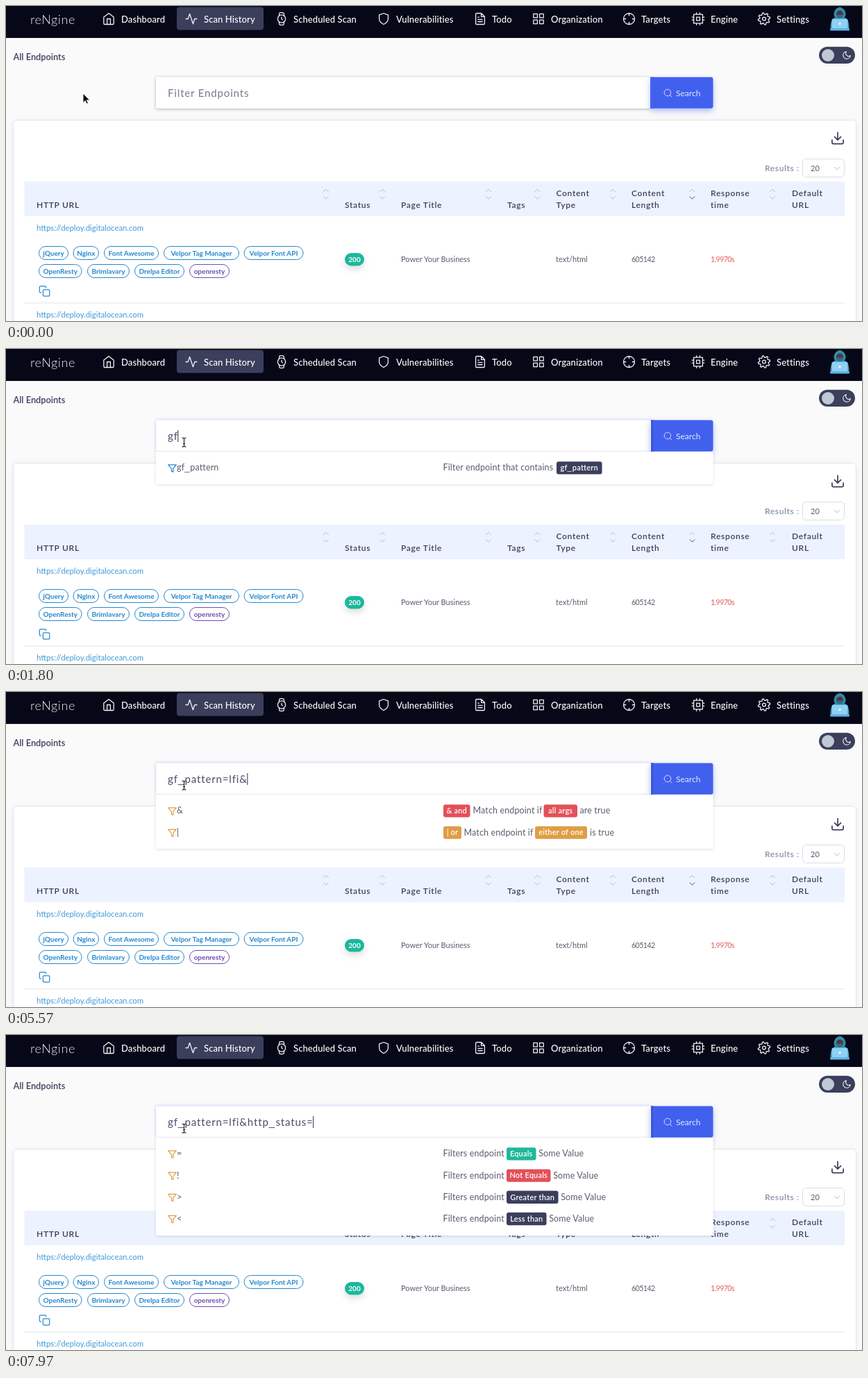
These frames come from a looping animation (1233 by 454 pixels, 8000 ms). An HTML page:

```html
<!DOCTYPE html>
<html lang="en">
<head>
<meta charset="utf-8">
<title>Endpoint filter</title>
<style>
  html, body { margin: 0; width: 100%; height: 100%; overflow: hidden; background: #fafafa; }
  svg { display: block; width: 1233px; height: 454px; font-family: Lato, "Open Sans", sans-serif; }
  text { white-space: pre; }
  .line { font-family: "Liberation Sans", Arial, sans-serif; font-weight: 400; letter-spacing: .1em; }
  .brand { font-size: 18px; letter-spacing: .6px; font-weight: 300; fill: #f1f2f6; }
  .nav { font-size: 13px; letter-spacing: .1px; font-weight: 500; fill: #fff; }
  .title { font-size: 12.8px; font-weight: 600; fill: #3b3f5c; }
  .input { font-size: 15px; letter-spacing: .85px; fill: #4a4d66; }
  .hint { fill: #75798b; }
  .search { font-size: 12px; fill: #e6eaff; }
  .option { font-size: 12.5px; letter-spacing: .13px; fill: #5a5c6d; }
  .badge { font-size: 11px; font-weight: 600; letter-spacing: .2px; fill: #fff; text-anchor: middle; }
  .results { font-size: 12px; font-weight: 600; letter-spacing: .6px; fill: #888ea8; }
  .head { font-size: 12px; font-weight: 600; letter-spacing: .7px; fill: #3b3f5c; }
  .url { font-size: 11.3px; fill: #3f9ad8; }
  .tag { font-size: 10px; font-weight: 700; text-anchor: middle; }
  .cell { font-size: 11px; fill: #5a5c6d; }
  .num { font-size: 10.6px; letter-spacing: -.55px; }
</style>
</head>
<body>
<svg id="stage" viewBox="0 0 1233 454"></svg>
<script>
const LOOP = 8000;
const NAVY = '#3b3f5c', BLUE = '#2788cd', PURPLE = '#6b4fb3', GREEN = '#1fb89b', RED = '#e35059', AMBER = '#e09d45';

const esc = s => s.replace(/&/g, '&amp;').replace(/</g, '&lt;');
// Lato's underscore is short, so a wider one stands in
const label = s => esc(s).replace(/_/g, '<tspan class="line">_</tspan>');
const text = (cls, x, y, s, extra = '') => `<text class="${cls}" x="${x}" y="${y}" ${extra}>${label(s)}</text>`;
const rect = (x, y, w, h, fill, r = 0, extra = '') =>
  `<rect x="${x}" y="${y}" width="${w}" height="${h}" rx="${r}" fill="${fill}" ${extra}/>`;

const ring = (cx, cy, r) => `M${cx - r} ${cy}a${r} ${r} 0 1 0 ${2 * r} 0a${r} ${r} 0 1 0 ${-2 * r} 0`;
const gear = () => {
  const points = [];
  for (let i = 0; i < 32; i++) {
    const a = (i + .5) * Math.PI / 16, r = i % 4 < 2 ? 8 : 10.8;
    points.push((12 + r * Math.cos(a)).toFixed(2) + ' ' + (12 + r * Math.sin(a)).toFixed(2));
  }
  return `M${points.join('L')}Z${ring(12, 12, 3)}`;
};
const ICONS = {
  home: 'M3 9l9-7 9 7v11a2 2 0 0 1-2 2H5a2 2 0 0 1-2-2zM9 22V12h6v10',
  pulse: 'M22 12h-4l-3 9L9 3l-3 9H2',
  watch: ring(12, 12, 7) + 'M12 9v3l1.5 1.5M16.5 17.3l-.4 3.9a2 2 0 0 1-2 1.8H9.8a2 2 0 0 1-2-1.8l-.3-3.9M7.5 6.7l.3-3.9a2 2 0 0 1 2-1.8h4.4a2 2 0 0 1 2 1.8l.3 3.9',
  shield: 'M12 22s8-4 8-10V5l-8-3-8 3v7c0 6 8 10 8 10z',
  file: 'M14 2H6a2 2 0 0 0-2 2v16a2 2 0 0 0 2 2h12a2 2 0 0 0 2-2V8zM14 2v6h6M16 13H8M16 17H8M10 9H8',
  grid: 'M3 3h7v7H3zM14 3h7v7h-7zM14 14h7v7h-7zM3 14h7v7H3z',
  target: ring(12, 12, 10) + 'M22 12h-4M6 12H2M12 6V2M12 22v-4',
  chip: 'M4 4h16v16H4zM9 9h6v6H9zM9 1v3M15 1v3M9 20v3M15 20v3M20 9h3M20 14h3M1 9h3M1 14h3',
  gear: gear(),
  moon: 'M21 12.8A9 9 0 1 1 11.2 3 7 7 0 0 0 21 12.8z',
  search: ring(11, 11, 8) + 'M21 21l-4.4-4.4',
  download: 'M21 15v4a2 2 0 0 1-2 2H5a2 2 0 0 1-2-2v-4M7 10l5 5 5-5M12 15V3',
  copy: 'M11 9h9a2 2 0 0 1 2 2v9a2 2 0 0 1-2 2h-9a2 2 0 0 1-2-2v-9a2 2 0 0 1 2-2zM5 15H4a2 2 0 0 1-2-2V4a2 2 0 0 1 2-2h9a2 2 0 0 1 2 2v1',
  funnel: 'M22 3H2l8 9.5V19l4 2v-8.5z',
  down: 'M6 9l6 6 6-6',
  up: 'M6 15l6-6 6 6'
};
const icon = (name, cx, cy, scale, color, width = 1.6) =>
  `<path d="${ICONS[name]}" transform="translate(${cx - 12 * scale} ${cy - 12 * scale}) scale(${scale})" fill="none" stroke="${color}" stroke-width="${width}" stroke-linecap="round" stroke-linejoin="round"/>`;

function navbar() {
  const items = [
    ['home', 148, 166, 'Dashboard'], ['pulse', 267, 285, 'Scan History'], ['watch', 397, 414, 'Scheduled Scan'],
    ['shield', 544, 562, 'Vulnerabilities'], ['file', 683, 700, 'Todo'], ['grid', 767, 785, 'Organization'],
    ['target', 897.5, 915, 'Targets'], ['chip', 997, 1015, 'Engine'], ['gear', 1092, 1110, 'Settings']
  ];
  const avatar = `<path d="M1187.5 32c0-9 2-14 8-16h11c6 2 8 7 8 16z" fill="#3d93b4"/>
    <path d="M1201 1.5c-6 1.500-8.500 6-8.500 10.500 0 3 2 5.500 4 6.500h9c2-1 4-3.500 4-6.500 0-4.500-2.500-9-8.500-10.500z" fill="#348ba8"/>
    <ellipse cx="1201" cy="11.500" rx="5" ry="5" fill="#4a3a42"/>
    <path d="M1196.300 12.500h9.400c0 3-2 5-4.700 5s-4.700-2-4.700-5z" fill="#2b6d88"/>`
    + rect(1189.5, 18.5, 23, 14.5, '#8fd0f5', 2) + rect(1187, 32, 28, 3.5, '#62b4e6', 1.5)
    + '<circle cx="1201" cy="25.5" r="1.8" fill="#e4f5ff"/>';
  return rect(0, 46, 1233, 1, '#f1eaf0') + rect(0, 0, 1233, 46, '#060818')
    + text('brand', 35, 25.5, 'reNgine') + rect(246, 1.5, 125, 33, NAVY, 4)
    + items.map(([name, ix, tx, s]) => icon(name, ix, 18.5, .8, '#f1f2f6') + text('nav', tx, 24, s)).join('')
    + avatar;
}

function searchBar() {
  return rect(216, 102.5, 712.5, 45, '#fff', 3, 'id="field"')
    + rect(928, 102.5, 90.5, 45, '#4361ee', 3, 'filter="url(#buttonShadow)"')
    + rect(928, 102.5, 6, 45, '#4361ee')
    + `<g id="focusEdge">${rect(928, 102.5, 1, 45, '#f2f5ff')}${rect(929, 102.5, 3, 45, '#3b56d8')}</g>`
    + icon('search', 953.5, 125.5, .6, '#dfe5ff', 1.5) + text('search', 965, 129.5, 'Search');
}

function card() {
  const heads = [
    [44, 291, 'HTTP URL'], [488, 291, 'Status'], [569, 291, 'Page Title'], [722, 291, 'Tags'],
    [792.5, 274, 'Content'], [792.5, 291, 'Type'], [901, 274, 'Content'], [901, 291, 'Length'],
    [1015, 274, 'Response'], [1015, 291, 'time'], [1132, 274, 'Default'], [1132, 291, 'URL']
  ];
  const sorters = [461, 542, 695, 765.5, 874, 988.5, 1104];
  const tags = [
    [47, 356, 43, 'jQuery'], [96.5, 356, 37.5, 'Nginx'], [141, 356, 79, 'Font Awesome'],
    [227, 356, 109, 'Velpor Tag Manager'], [342.5, 356, 86, 'Velpor Font API'],
    [47, 382, 62.5, 'OpenResty'], [117, 382, 61, 'Brimlavary'], [185, 382, 72, 'Drelpa Editor'],
    [264, 382, 58, 'openresty', PURPLE]
  ];
  const tag = ([x, cy, w, s, color = BLUE]) =>
    rect(x + .5, cy - 9.5, w - 1, 19, '#fff', 9.5, `stroke="${color}"`)
    + text('tag', x + w / 2, cy + 3.5, s, `fill="${color}"`);
  const url = 'https://deploy.digitalocean.com';
  return rect(10.5, 164.5, 1214, 320, '#fff', 5, 'stroke="#e0e4ea" filter="url(#cardShadow)"')
    + icon('download', 1198, 190.5, .9, NAVY, 1.9)
    + text('results', 1093, 238, 'Results :')
    + rect(1147.5, 220.5, 60, 26, '#fff', 5, 'stroke="#d9dee6"')
    + text('cell', 1159, 238, '20') + icon('down', 1197, 234, .6, '#b0b6c4')
    + rect(26.5, 253, 1181.5, 50, '#edf2ff')
    + heads.map(h => text('head', ...h)).join('')
    + sorters.map(x => icon('up', x, 266, .58, '#aeb5c6') + icon('down', x, 276.5, .58, x === 988.5 ? NAVY : '#aeb5c6')).join('')
    + text('url', 44, 323.5, url) + tags.map(tag).join('')
    + icon('copy', 55.5, 411, .72, BLUE, 1.7)
    + rect(488, 356, 28, 18.5, GREEN, 9.25, 'filter="url(#pillShadow)"') + text('tag', 502, 368.8, '200', 'fill="#fff"')
    + text('cell', 569, 369, 'Power Your Business') + text('cell', 792, 369, 'text/html')
    + text('cell num', 901, 369, '605142') + text('cell num', 1015, 369, '1.9970s', 'style="fill:#e0605f"')
    + rect(26.5, 427.5, 1181.5, 1, '#dfe3e9') + text('url', 44, 448.5, url);
}

// Suggestion parts: [x, text] is plain, [x, text, width, color] is a badge.
const WIDTHS = { http_url: 51, http_status: 69, page_title: 62, gf_pattern: 65.5, content_type: 78, content_length: 87, technology: 65 };
const keyword = name => [BLUE, name, [629.5, 'Filter endpoint that contains'], [793, name, WIDTHS[name], NAVY]];
const operator = (sign, name, width, color) =>
  [AMBER, sign, [629.5, 'Filters endpoint'], [721, name, width, color], [721 + width + 3.7, 'Some Value']];
const keywords = match => Object.keys(WIDTHS).filter(name => name.includes(match)).map(keyword);
const LISTS = {
  all: keywords(''), g: keywords('g'), gf: keywords('gf'),
  h: keywords('h'), http: keywords('http'), status: keywords('http_s'),
  compare: [
    operator('=', 'Equals', 42.5, GREEN), operator('!', 'Not Equals', 63.5, RED),
    operator('>', 'Greater than', 74.5, NAVY), operator('<', 'Less than', 57.5, NAVY)
  ],
  join: [
    [AMBER, '&', [630, '& and', 38.5, RED], [672.5, 'Match endpoint if'], [774.5, 'all args', 48.5, RED], [826.5, 'are true']],
    [AMBER, '|', [630, '| or', 26, AMBER], [659.5, 'Match endpoint if'], [762, 'either of one', 75, AMBER], [841, 'is true']]
  ]
};
const listBottom = rows => Math.min(351.5, 163.3 + 31.4 * rows.length);

function suggestion([color, name, ...parts], i) {
  const y = 171.4 + 31.2 * i;
  const part = ([x, s, w, fill]) => w
    ? rect(x, y - 9.2, w, 18.4, fill, 3) + text('badge', x + w / 2, y + 3.8, s)
    : text('option', x, y + 4, s);
  return icon('funnel', 239.5, y + .7, .58, color, 2.1) + text('option', 246, y + 4, name) + parts.map(part).join('');
}
const menus = () => Object.entries(LISTS).map(([name, rows]) => {
  const height = listBottom(rows) - 148;
  return `<g class="menu" id="menu-${name}">${rect(216, 148, 802.5, height, '#fff', 2, 'filter="url(#menuShadow)"')}
    <g clip-path="url(#menuClip)">${rows.map(suggestion).join('')}</g></g>`;
}).join('');

const shadow = (id, dy, blur, color, opacity) =>
  `<filter id="${id}" x="-50%" y="-60%" width="200%" height="250%"><feDropShadow dx="0" dy="${dy}" stdDeviation="${blur}" flood-color="${color}" flood-opacity="${opacity}"/></filter>`;

const stage = document.getElementById('stage');
stage.innerHTML = `<defs>
  ${shadow('restShadow', 1, 2, '#303440', .4)}${shadow('focusShadow', 0, 2.2, '#4361ee', .4)}
  ${shadow('buttonShadow', 4, 4, '#4361ee', .4)}${shadow('menuShadow', 1, 2, '#000', .13)}
  ${shadow('pillShadow', 5, 5, '#000', .13)}${shadow('cardShadow', 2, 4, '#000', .05)}
  <clipPath id="menuClip">${rect(216, 148, 803, 203.5, '#000')}</clipPath></defs>`
  + rect(0, 0, 1233, 454, '#fafafa') + navbar() + text('title', 10.5, 78, 'All Endpoints')
  + rect(1171, 58.7, 52, 24.3, NAVY, 12.15) + '<circle cx="1184" cy="71" r="9" fill="#bfc9d4"/>'
  + icon('moon', 1211, 71, .58, '#fff', 1.8)
  + card() + searchBar() + menus()
  + text('input', 233, 131, '', 'id="query"') + rect(0, 117, 1, 17, '#30334a', 0, 'id="caret"')
  + `<path id="arrow" d="M0 0V13.5L3.2 10.6L5.3 15L7.4 14L5.4 9.8H9.6Z" fill="#111" stroke="#fff" stroke-width=".8"/>
     <path id="beam" d="M-3-6.5Q0-6.5 0-5Q0-6.5 3-6.5M0-5V5M-3 6.5Q0 6.5 0 5Q0 6.5 3 6.5M-1.5 2H1.5" fill="none" stroke="#222" stroke-width="1.2"/>`;

const QUERY = 'gf_pattern=lfi&http_status=';
const KEY_TIMES = [1570, 1770, 2070, 2300, 2430, 2600, 2730, 2870, 3030, 3200, 3670, 4000, 4230, 4370, 5570,
  6070, 6200, 6270, 6430, 6730, 6970, 7130, 7270, 7370, 7470, 7600, 7970];
const MENU_TIMES = [[0, ''], [730, 'all'], [1700, 'g'], [1800, 'gf'], [3230, 'compare'], [3730, ''], [5570, 'join'],
  [5670, 'all'], [6130, 'h'], [6270, 'http'], [7070, 'status'], [7630, 'compare']];
const POINTER = [[0, 111, 126], [300, 135, 127], [370, 175, 131], [430, 199, 130], [600, 227, 132], [630, 245, 134], [670, 256.5, 134.5]];
const FOCUS = 700;
const BLINKS = [[1230, 1570], [5000, 5570]];

const $ = id => document.getElementById(id);
const show = (el, on) => { el.style.display = on ? '' : 'none'; };
const latest = (track, t) => track.filter(step => step[0] <= t).pop();
const menuGroups = [...document.querySelectorAll('.menu')];
let shownQuery = null;

function draw(t) {
  const focused = t >= FOCUS;
  const typed = QUERY.slice(0, KEY_TIMES.filter(k => k <= t).length);
  const query = $('query');
  if (typed !== shownQuery) {
    query.innerHTML = label(typed || 'Filter Endpoints');
    query.setAttribute('class', typed ? 'input' : 'input hint');
    $('caret').setAttribute('x', typed ? 233 + query.getComputedTextLength() - .5 : 233);
    shownQuery = typed;
  }
  show($('caret'), focused && !BLINKS.some(([from, to]) => t >= from && t < to));
  $('field').setAttribute('filter', `url(#${focused ? 'focusShadow' : 'restShadow'})`);
  show($('focusEdge'), focused);

  const menu = latest(MENU_TIMES, t)[1];
  menuGroups.forEach(g => show(g, g.id === 'menu-' + menu));

  const [, x, y] = latest(POINTER, t);
  const overField = x > 216;
  show($('arrow'), !overField);
  show($('beam'), overField);
  $(overField ? 'beam' : 'arrow').setAttribute('transform', `translate(${x} ${y})`);
}

const start = performance.now();
function tick() {
  draw((performance.now() - start) % LOOP);
  requestAnimationFrame(tick);
}
tick();
</script>
</body>
</html>
```
